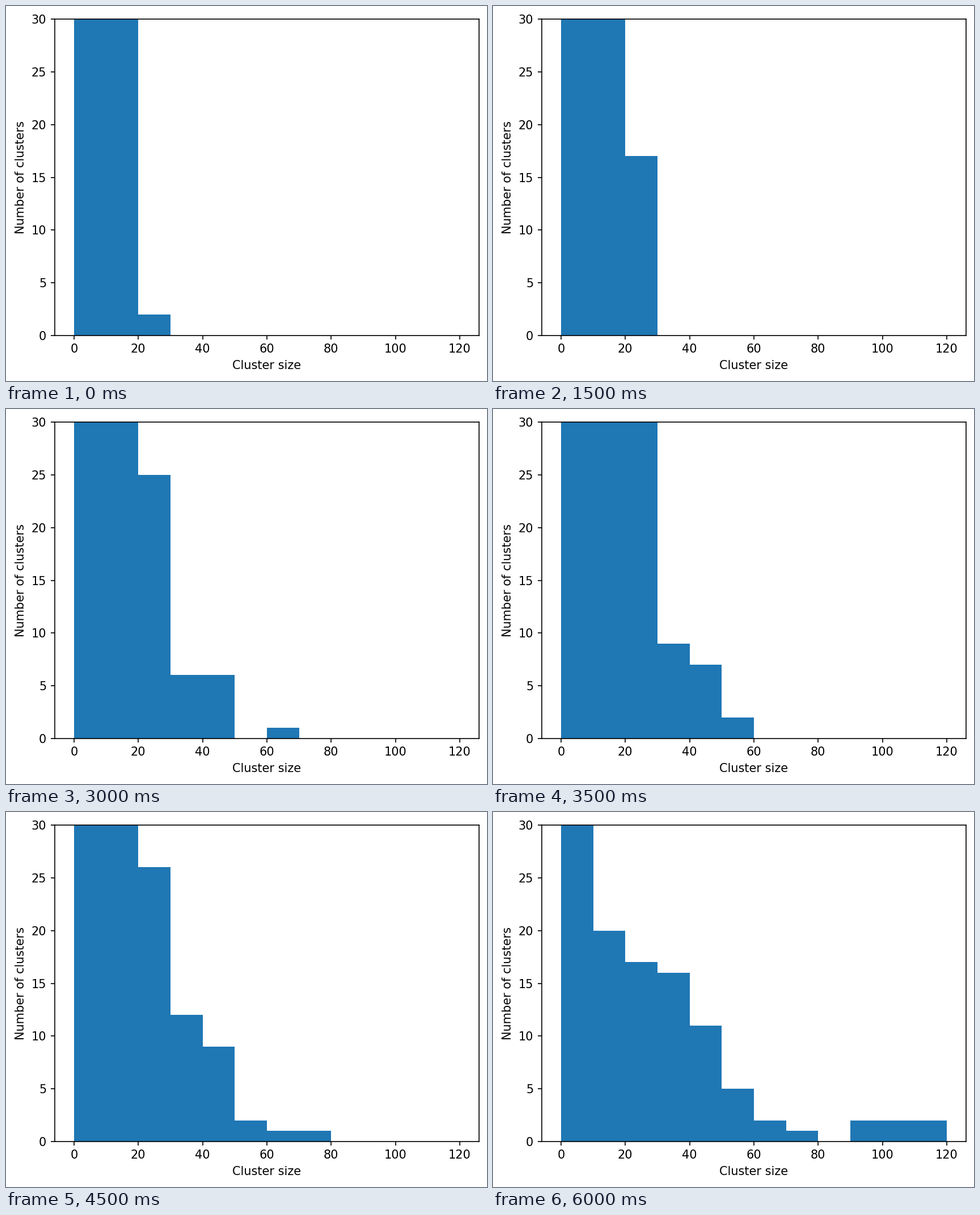
Write a matplotlib script that moves like this. It is 848 px wide and 660 px high and loops after 8 s.

```python
import matplotlib.pyplot as plt
from matplotlib.animation import FuncAnimation

W, H, DPI = 848, 660, 150
LEFT, RIGHT, TOP, BOTTOM = 85.85, 833.85, 23.3, 579.7
BIN, BINS, Y_MAX = 10, 12, 30
OVER = Y_MAX + 10  # taller than the axis, so clipped at the top

# Counts per step for the bins from size 20 upwards
TAILS = [
    [2],
    [6],
    [8],
    [17],
    [28, 2, 1],
    [25, 6, 4, 1],
    [25, 6, 6, 0, 1],
    [30, 9, 7, 2],
    [29, 12, 9, 1],
    [26, 12, 9, 2, 1, 1],
    [26, 13, 8, 3, 2, 1],
    [23, 14, 8, 4, 3, 1, 0, 1, 1, 1],
    [17, 16, 11, 5, 2, 1, 0, 2, 2, 2],
]
SECOND_BIN = {11: 25, 12: 20}  # the 10-20 bin, once it drops into view
STEPS, STEP_MS = 16, 500

plt.rcParams.update({"font.family": "DejaVu Sans", "font.size": 10.04})

fig = plt.figure(figsize=(W / DPI, H / DPI), dpi=DPI, facecolor="white")
ax = fig.add_axes([LEFT / W, 1 - BOTTOM / H,
                   (RIGHT - LEFT) / W, (BOTTOM - TOP) / H])
bars = ax.bar([BIN * i for i in range(BINS)], [0] * BINS, width=BIN,
              align="edge", color="#1f77b4", linewidth=0)
ax.set(xlim=(-6, 126), ylim=(0, Y_MAX),
       xticks=range(0, 121, 20), yticks=range(0, Y_MAX + 1, 5),
       xlabel="Cluster size", ylabel="Number of clusters")


def counts(step):
    step = min(step, len(TAILS) - 1)
    row = [OVER, SECOND_BIN.get(step, OVER)] + TAILS[step]
    return row + [0] * (BINS - len(row))


def update(step):
    for bar, n in zip(bars, counts(step)):
        bar.set_height(n)
    return list(bars)


anim = FuncAnimation(fig, update, frames=STEPS, interval=STEP_MS,
                     repeat=True, repeat_delay=0, blit=False)
plt.show()
```
